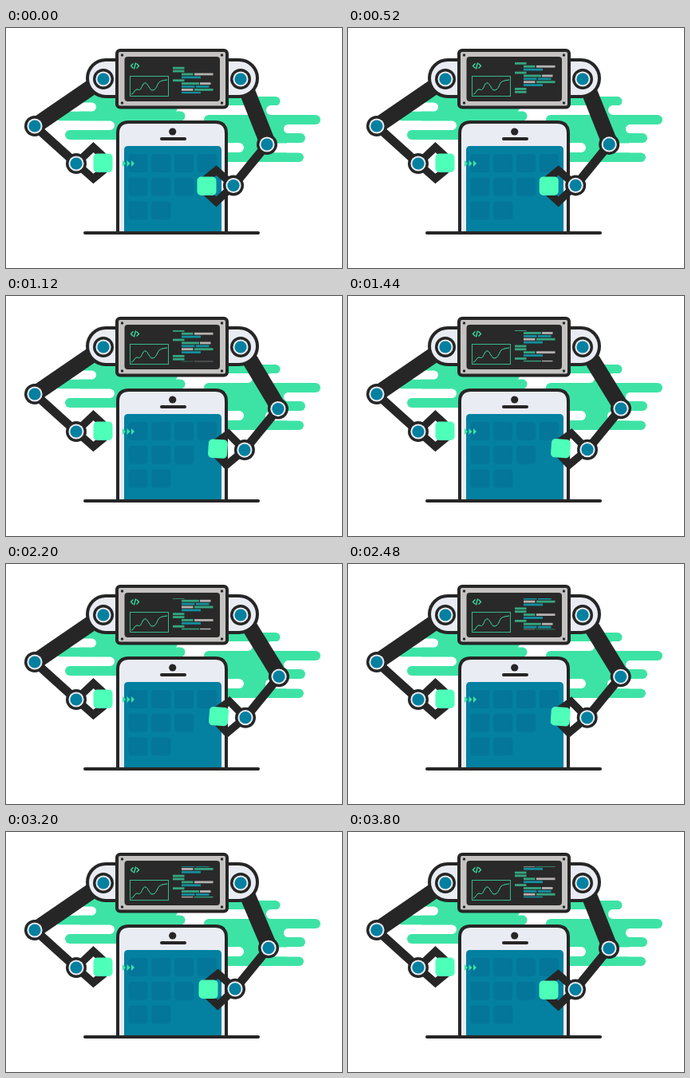
Animation of 421 by 301 pixels, one loop 3.84 s. Source, as an HTML page:

```html
<!DOCTYPE html>
<html lang="en">
<head>
<meta charset="utf-8">
<title>Robot building an app</title>
<style>
  html, body { margin: 0; width: 100%; height: 100%; overflow: hidden; background: #fff; }
  svg { display: block; width: 421px; height: 301px; }
</style>
</head>
<body>
<svg viewBox="0 0 421 301" fill="none" stroke-linejoin="miter">
  <defs>
    <clipPath id="codeClip"><rect x="205" y="43" width="58" height="39.3"/></clipPath>
    <g id="joint">
      <circle r="13" fill="#262626"/>
      <circle r="9.6" fill="#e9ecf3"/>
      <circle r="7.6" fill="#0480a0"/>
    </g>
    <!-- gripper pointing left, wrist at the origin -->
    <g id="claw">
      <path d="M0 0L-21.5 -19L-36 -7M0 0L-21.5 20.5L-34 9" stroke="#262626" stroke-width="9.5"/>
      <rect x="-45.5" y="-11" width="24" height="23.5" rx="5" fill="#4dffb9"/>
    </g>
  </defs>

  <g id="cloud"></g>

  <!-- phone -->
  <path d="M140 257V132Q140 118 154 118H262Q276 118 276 132V257" fill="#e9ecf3" stroke="#262626" stroke-width="4"/>
  <path d="M148 256V153Q148 148 153 148H265Q270 148 270 153V256Z" fill="#0480a0"/>
  <circle cx="208.7" cy="130" r="4.6" fill="#262626"/>
  <path d="M195 139H224" stroke="#262626" stroke-width="4" stroke-linecap="round"/>
  <g id="icons" fill="#04769a"></g>
  <path d="M146 166l4 4l-4 4M151.5 166l4 4l-4 4M157 166l4 4l-4 4" fill="#3de3a5"/>
  <path d="M99 257H316" stroke="#262626" stroke-width="4" stroke-linecap="round"/>

  <!-- arms -->
  <g stroke="#262626">
    <path d="M122 64L36 123" stroke-width="20"/>
    <path d="M36 123L88 170" stroke-width="11"/>
    <path id="upper" stroke-width="20"/>
    <path id="lower" stroke-width="11"/>
  </g>
  <use href="#claw" transform="translate(88 170) rotate(180)"/>
  <use href="#claw" id="grip"/>
  <use href="#joint" x="36" y="123"/>
  <use href="#joint" x="88" y="170"/>
  <use href="#joint" id="elbow"/>
  <use href="#joint" id="wrist"/>

  <!-- head -->
  <g fill="#e9ecf3" stroke="#262626" stroke-width="4">
    <path d="M145 40H125A23 23 0 0 0 125 86H145"/>
    <path d="M271 40H292A23 23 0 0 1 292 86H271"/>
  </g>
  <use href="#joint" x="122" y="64"/>
  <use href="#joint" x="294" y="64"/>
  <rect x="139" y="28" width="138" height="71.5" rx="4" fill="#c5c3c2" stroke="#262626" stroke-width="4"/>
  <rect x="148.5" y="36" width="119.5" height="56" rx="4" fill="#292929"/>
  <path d="M145.5 34h.01M270.5 34h.01M145.5 94h.01M270.5 94h.01" stroke="#262626" stroke-width="3.4" stroke-linecap="round"/>
  <g stroke="#3de3a5">
    <path d="M159.5 44.5l-3 3l3 3M163.5 44.5l3 3l-3 3M162.5 43.5l-2 8" stroke-width="1.3"/>
    <rect x="155.5" y="60.5" width="48" height="25" stroke="#37b98a"/>
    <path d="M157 83C160 83 161 77 164 77S167 79 169 76S172 68 175 69S180 78 183 78S188 76 190 71S196 66 202 65"/>
  </g>
  <g clip-path="url(#codeClip)"><g id="code"></g></g>
</svg>

<script>
const LOOP = 3840;
const $ = id => document.getElementById(id);

function rect(parent, x, y, width, height, rx, fill) {
  const el = document.createElementNS('http://www.w3.org/2000/svg', 'rect');
  const attrs = { x, y, width, height, rx };
  if (fill) attrs.fill = fill;
  for (const key in attrs) el.setAttribute(key, attrs[key]);
  parent.append(el);
}

// Green streaks: blocks and round bars, with round white bars cut into them
const GREEN = '#3de3a5', WHITE = '#fff';
const block = (x1, x2, y1, y2) => rect($('cloud'), x1, y1, x2 - x1, y2 - y1, 0, GREEN);
const bar = (x1, x2, y, fill = GREEN, h = 12) => rect($('cloud'), x1, y, x2 - x1, h, h / 2, fill);
block(92, 208, 84, 140);
bar(180, 215, 94);
bar(62, 224.5, 104.5);
bar(74, 160, 128);
bar(50, 113, 93.5, WHITE, 11);
bar(50, 136, 116.5, WHITE, 11.5);
block(276, 332, 86, 109);
block(276, 352, 109, 168);
bar(270, 343.5, 86, GREEN, 11.5);
bar(240, 309, 97, WHITE);
bar(326, 400, 97, WHITE);
bar(348, 420, 121, WHITE, 11);
bar(255, 298, 144, WHITE);
bar(325, 400, 144.5, WHITE);
bar(248, 394, 109);
bar(270, 375, 132);
bar(270, 373, 156.5, GREEN, 11.5);

// App icons, with one slot left for the carried tile
[4, 3, 2].forEach((count, row) => {
  for (let i = 0; i < count; i++) rect($('icons'), 153.5 + i * 28.8, 158 + row * 29.7, 24, 23, 4);
});

// Code lines as [x, width, colour]; the listing appears twice
const G = '#35a680', T = '#12909f', S = '#b5b1b0';
const tag = [[209, 14.5, G]];
const lines = [
  tag, tag,
  [[220, 14.5, G], [236, 23.5, S]],
  [[220, 24, T]],
  tag,
  [[220, 22, G], [243, 13.5, S]],
  [[220, 16.5, T], [238, 16.5, T]],
  [[220, 14.5, S], [236, 23.5, G]],
  [[220, 24, T]]
];
for (const top of [48.8, 84.7])
  lines.forEach((parts, i) => {
    for (const [x, w, fill] of parts) rect($('code'), x, top + i * 3.89, w, 2.8, 0, fill);
  });

const ease = (t, start, end) => {
  const p = Math.min(1, Math.max(0, (t - start) / (end - start)));
  return (1 - Math.cos(Math.PI * p)) / 2;
};

function draw(t) {
  const scroll = 9.7 * ease(t, 0, 400) + 13.5 * ease(t, 1050, 1450)
    + 7.8 * ease(t, 2160, 2560) + 4.2 * ease(t, 3440, 3840);
  $('code').setAttribute('transform', `translate(0 ${-scroll})`);

  const out = ease(t, 460, 1260) - ease(t, 2380, 3460);
  const elbow = [327 + 15 * out, 146 - 4.8 * out];
  const wrist = [285 + 15 * out, 197.5 - 4.8 * out];
  $('upper').setAttribute('d', `M296 64L${elbow[0] + 1.5} ${elbow[1]}`);
  $('lower').setAttribute('d', `M${elbow}L${wrist}`);
  $('elbow').setAttribute('transform', `translate(${elbow})`);
  $('wrist').setAttribute('transform', `translate(${wrist})`);
  $('grip').setAttribute('transform', `translate(${wrist}) rotate(${4 * out})`);
}

const begin = performance.now();
function tick() {
  draw((performance.now() - begin) % LOOP);
  requestAnimationFrame(tick);
}
tick();
</script>
</body>
</html>
```
